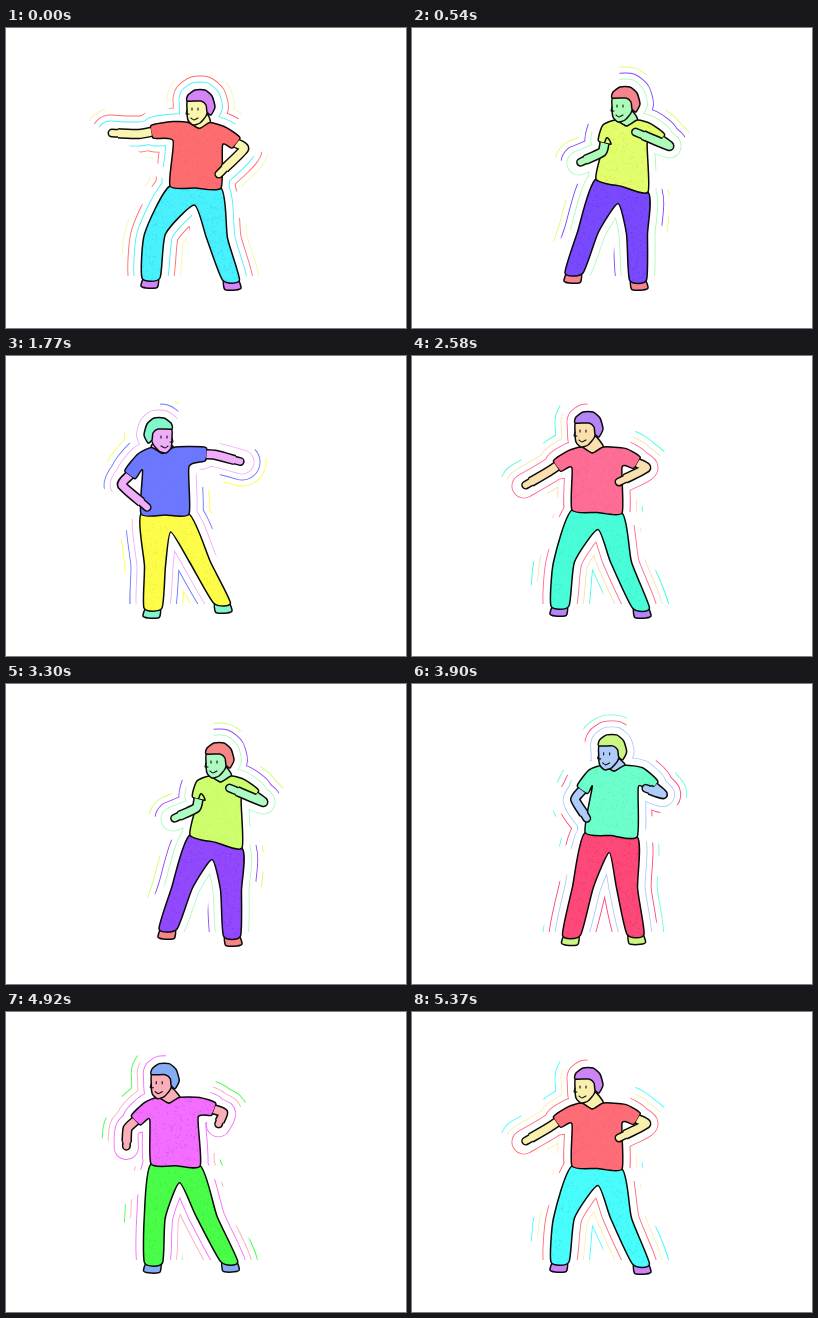
Write an HTML page with a canvas that moves like this. It is 400x300 px and loops after 5400 ms.

```html
<!DOCTYPE html>
<html lang="en">
<head>
<meta charset="utf-8">
<title>Dancer</title>
<style>
  html, body { margin: 0; width: 100%; height: 100%; overflow: hidden; background: #fff; }
  canvas { display: block; width: 400px; height: 300px; }
</style>
</head>
<body>
<canvas id="stage" width="400" height="300"></canvas>
<script>
const ctx = document.getElementById('stage').getContext('2d');
const CYCLE = 2700, STEPS = 22, FRAME = 30;
const INK = '#0a0a0a', LINE = 1.5;

const pts = s => s.split(' ').map(p => p.split(',').map(Number));
const mix = (a, b, u) => [a[0] + (b[0] - a[0]) * u, a[1] + (b[1] - a[1]) * u];
const add = (p, x, y) => [p[0] + x, p[1] + y];

function random(seed) {
  return () => (seed = (seed * 16807) % 2147483647) / 2147483647;
}

// Key poses. Pairs are left, right; arms run shoulder, elbow, hand; legs run hip, knee, ankle.
// "rings" names the aura colours from the inside out.
const poses = [
  {
    at: 0, flip: 1, rings: ['pants', 'shirt', 'skin'], head: pts('194,78'),
    armL: pts('168,100 133,106 104,105'), armR: pts('217,105 238,121 211,148'),
    legL: pts('164,158 149,206 145,250'), legR: pts('215,160 211,210 225,252')
  },
  {
    at: 4, flip: 1, rings: ['skin', 'pants', 'shirt'], head: pts('213,75'),
    armL: pts('197,99 190,124 167,135'), armR: pts('235,101 257,118 221,103'),
    legL: pts('184,151 176,204 162,245'), legR: pts('236,164 225,206 226,252')
  },
  {
    at: 8, flip: 1, rings: ['skin', 'pants', 'shirt'], head: pts('204,69'),
    armL: pts('187,91 169,116 179,135'), armR: pts('231,91 255,116 228,107'),
    legL: pts('178,149 174,203 162,251'), legR: pts('231,154 218,205 225,251')
  },
  {
    at: 14, flip: -1, rings: ['skin', 'shirt', 'pants'], head: pts('153,78'),
    armL: pts('137,102 116,129 143,153'), armR: pts('183,97 210,99 236,106'),
    legL: pts('135,158 149,210 147,252'), legR: pts('183,158 194,206 216,247')
  },
  {
    at: 21, flip: 1, rings: ['shirt', 'skin', 'pants'], head: pts('176,72'),
    armL: pts('160,100 136,116 112,130'), armR: pts('210,98 234,112 205,127'),
    legL: pts('160,154 152,206 148,250'), legR: pts('210,157 209,206 229,252')
  }
];
const JOINTS = ['head', 'armL', 'armR', 'legL', 'legR'];

// Head shapes around their centre, looking left.
const FACE = pts('-12,-6 -13,3 -12,14 -7,19 0,17 6,10 8,2 6,-8');
const HAIR = pts('-13,-5 -12,-11 -5,-16 5,-16 12,-10 15,1 11,9 7,6 6,-1 1,-5');
const MARKS = ['-8,2 -8,4', '-2,2 -2,4', '-13,4 -14,8 -11,8', '-9,12 -6,14 -2,12'].map(pts);

const rand = random(7);
const specks = Array.from({ length: 1800 }, () => [100 + rand() * 170, 80 + rand() * 175]);

function poseAt(step) {
  let i = poses.length - 1;
  while (poses[i].at > step) i--;
  const a = poses[i], b = poses[(i + 1) % poses.length];
  const end = a.at < b.at ? b.at : STEPS;
  const u = (step - a.at) / (end - a.at);
  const bump = Math.sin(Math.PI * u);
  const near = u < 0.5 ? a : b;
  const body = { flip: near.flip, rings: near.rings, seed: 31 + near.at * 977 };
  const lean = mix(a.head[0], b.head[0], u)[0] < 185 ? -8 : 8;
  for (const part of JOINTS) {
    body[part] = a[part].map((p, j) => {
      const q = mix(p, b[part][j], u);
      const k = bump * Math.max(0, (252 - q[1]) / 175);
      return add(q, lean * k, -7 * k);
    });
  }
  return body;
}

// Half of the shirt: shoulder, sleeve and armpit of one side (1 = left, -1 = right).
function sleeve([shoulder, elbow], hip, side) {
  const dx = elbow[0] - shoulder[0], dy = elbow[1] - shoulder[1];
  const s = 6.5 * side / Math.hypot(dx, dy), nx = -dy * s, ny = dx * s;
  const cuff = mix(shoulder, elbow, 0.62);
  return [add(shoulder, nx, ny), add(cuff, nx, ny), add(cuff, -nx, -ny), mix(shoulder, hip, 0.22)];
}

function outline(b) {
  const { armL, armR, legL, legR } = b, head = b.head[0];
  const top = mix(armL[0], armR[0], 0.5);
  const collar = [(top[0] + head[0]) / 2, top[1] - 6];
  const neck = [add(collar, 11, -2), add(collar, 0, 4), add(collar, -11, -2)];
  const waist = mix(legL[0], legR[0], 0.5), base = mix(legL[2], legR[2], 0.5);
  const crotch = [mix(waist, base, 0.25)[0], waist[1] + 18];
  const wide = (p, w) => add(p, w, 0);
  const shoe = (p, toe) => [wide(p, -7), wide(p, 7), add(p, 7 + Math.max(0, toe), 8),
    add(p, 5, 10), add(p, -5, 10), add(p, -7 + Math.min(0, toe), 8)];
  const place = q => q.map(([x, y]) => add(head, x * b.flip, y));
  return {
    shoes: [shoe(legL[2], -3), shoe(legR[2], 3)],
    pants: [legL[0], wide(legL[1], -10.5), wide(legL[2], -9), wide(legL[2], 9), wide(legL[1], 10.5),
      crotch, wide(legR[1], -10.5), wide(legR[2], -8.5), wide(legR[2], 8.5), wide(legR[1], 10.5), legR[0]],
    shirt: [...neck, ...sleeve(armL, legL[0], 1), legL[0], mix(waist, base, 0.01), legR[0],
      ...sleeve(armR, legR[0], -1).reverse()],
    neck: [add(head, -6, 10), add(head, 7, 8), ...neck],
    arms: [armL, armR],
    face: place(FACE), hair: place(HAIR), marks: MARKS.map(place)
  };
}

function trace(p, closed = true) {
  const n = p.length, k = 0.1;
  const get = i => closed ? p[(i + n) % n] : p[Math.max(0, Math.min(n - 1, i))];
  ctx.beginPath();
  ctx.moveTo(...p[0]);
  for (let i = 0; i < (closed ? n : n - 1); i++) {
    const [a, b, c, d] = [get(i - 1), get(i), get(i + 1), get(i + 2)];
    ctx.bezierCurveTo(b[0] + (c[0] - a[0]) * k, b[1] + (c[1] - a[1]) * k,
      c[0] - (d[0] - b[0]) * k, c[1] - (d[1] - b[1]) * k, c[0], c[1]);
  }
  if (closed) ctx.closePath();
}

function stroke(color, width, cap = 'round') {
  ctx.strokeStyle = color;
  ctx.lineWidth = width;
  ctx.lineCap = cap;
  ctx.stroke();
}

function shape(p, color, grain) {
  trace(p);
  ctx.fillStyle = color;
  ctx.fill();
  if (grain) {
    ctx.save();
    ctx.clip();
    ctx.fillStyle = grain;
    for (const [x, y] of specks) ctx.fillRect(x, y, 1, 1);
    ctx.restore();
    trace(p);
  }
  stroke(INK, LINE);
}

function arm([shoulder, elbow, hand], color) {
  const wrist = mix(elbow, hand, 0.72);
  for (const [tint, grow] of [[INK, LINE], [color, -LINE]]) {
    trace([mix(shoulder, elbow, 0.65), elbow, wrist], false);
    stroke(tint, 9 + grow, 'butt');
    trace([wrist, mix(elbow, hand, 0.93)], false);
    stroke(tint, 7.5 + grow);
  }
}

// Fills the whole figure, grown outwards by d.
function silhouette(o, d, color) {
  ctx.fillStyle = color;
  for (const p of [o.pants, o.shirt, o.face, o.hair]) {
    trace(p);
    ctx.fill();
    stroke(color, 2 * d);
  }
  for (const p of o.arms) {
    trace(p, false);
    stroke(color, 9 + 2 * d);
  }
}

// Broken contour lines around the figure: each ring is a grown silhouette with wedges cut away.
function aura(o, b, tone) {
  const r = random(b.seed);
  const [cx, cy] = mix(b.legL[0], b.legR[0], 0.5);
  ctx.save();
  ctx.beginPath();
  ctx.rect(0, 0, 400, 248);
  ctx.clip();
  for (let i = 2; i >= 0; i--) {
    const d = 8 + i * 6;
    silhouette(o, d, tone[b.rings[i]]);
    ctx.fillStyle = '#fff';
    const cuts = 3 + i * 2, phase = r() * 6;
    for (let j = 0; j < cuts; j++) {
      const from = phase + (j + r() * 0.3) * 2 * Math.PI / cuts;
      ctx.beginPath();
      ctx.moveTo(cx, cy);
      ctx.arc(cx, cy, 200, from, from + 0.25 + r() * 0.3);
      ctx.fill();
    }
    silhouette(o, d - 0.9, '#fff');
  }
  ctx.restore();
}

function draw(ms) {
  const t = Math.floor(ms / FRAME) * FRAME % CYCLE;
  const hsl = (h, s, l, a = 1) => `hsla(${(h + t / CYCLE * 360) % 360},${s}%,${l}%,${a})`;
  const tone = {
    shirt: hsl(0, 98, 71), pants: hsl(184, 98, 64),
    skin: hsl(56, 88, 83), hair: hsl(282, 86, 74)
  };
  const b = poseAt(Math.floor(t * STEPS / CYCLE)), o = outline(b);

  ctx.fillStyle = '#fff';
  ctx.fillRect(0, 0, 400, 300);
  ctx.lineJoin = 'round';
  aura(o, b, tone);

  for (const s of o.shoes) shape(s, tone.hair);
  shape(o.pants, tone.pants, hsl(190, 75, 50, 0.4));
  shape(o.neck, tone.skin);
  shape(o.shirt, tone.shirt, hsl(335, 75, 62, 0.5));
  for (const a of o.arms) arm(a, tone.skin);
  shape(o.face, tone.skin);
  shape(o.hair, tone.hair);
  for (const m of o.marks) {
    trace(m, false);
    stroke(INK, 1.1);
  }
}

const start = performance.now();
function loop() {
  draw(performance.now() - start);
  requestAnimationFrame(loop);
}
loop();
</script>
</body>
</html>
```
